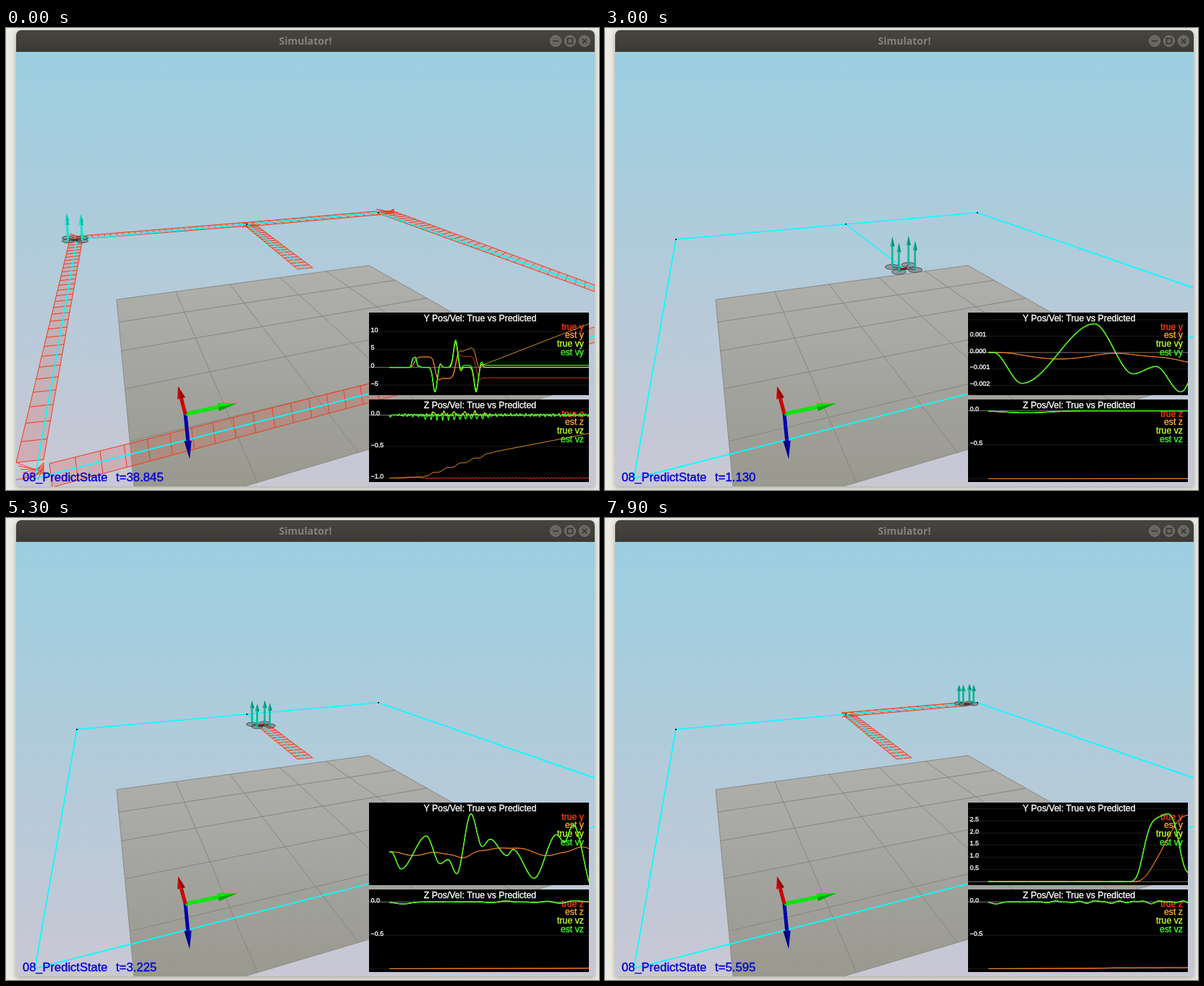
Write an HTML page with a canvas that moves like this. It is 820 px wide and 638 px high and loops after 8000 ms.

```html
<!DOCTYPE html>
<html lang="en">
<head>
<meta charset="utf-8">
<title>Simulator</title>
<style>
html, body { margin: 0; width: 100%; height: 100%; overflow: hidden; background: #ebebe4; }
canvas { display: block; }
</style>
</head>
<body>
<canvas id="stage" width="820" height="638"></canvas>
<script>
const c = document.getElementById('stage').getContext('2d');
const SANS = '"Liberation Sans", Arial, sans-serif';
const TITLE = '"Open Sans", "Noto Sans", sans-serif';
const LOOP = 8000, RESTART = 1800;
const HOLDS = [1200, 2300, 4800, 5400, 6100];
const RED = '#ff3c10', ORANGE = '#ffaa30', LIME = '#c4ff20', GREEN = '#3cff20';
const RAIL = '#f03c18';

const lerp = (a, b, k) => a + (b - a) * k;
const mix = (a, b, k) => [lerp(a[0], b[0], k), lerp(a[1], b[1], k)];
const clamp = v => Math.max(0, Math.min(1, v));
const smooth = v => { const s = clamp(v); return s * s * (3 - 2 * s); };
const bell = (t, mid, width, power = 2) => Math.exp(-(Math.abs((t - mid) / width) ** power));
const gate = (t, a, b) => clamp((t - a) * 2) * clamp((b - t) * 2);

// Value at t between [t, value] keys
function keyed(keys, t, ease = v => v) {
  let i = 0;
  while (i < keys.length - 2 && t >= keys[i + 1][0]) i++;
  const [a, b] = [keys[i], keys[i + 1]];
  return lerp(a[1], b[1], ease((t - a[0]) / (b[0] - a[0])));
}

// Simulator clock: the end of one run, then a fresh one
const clock = [[RESTART, .07], [2100, .335], [3700, 1.745], [4600, 2.55], [6000, 3.9], [7900, 5.595]];
function simTime(ms) {
  const t = ms < RESTART ? 38.845 + .00064 * ms : keyed(clock, ms);
  return Math.round(t * 200) / 200;
}

// Hover drift in mm/s, given by its turning points
const drift = [[.03, 0], [.19, -1.88], [.6, 1.75], [.82, -1.3], [.95, -.85], [1.09, -2.4], [1.32, 4.2], [1.5, .6],
  [1.63, 1.4], [1.9, -.4], [2, .25], [2.34, -2.9], [2.7, 1.9], [2.83, 1.1], [2.97, 3], [3.32, -4.7], [3.62, 4.6],
  [3.92, -9.8], [4.05, 0], [4.1, 0]];

// One side step, then a sharp turn every four seconds
function sideSpeed(t) {
  let v = keyed(drift, t, smooth) / 1000;
  v += 2.7 * (1 + .25 * (t - 4.84)) * bell(t, 4.84, .55, 4) + .35 * bell(t, 5.75, .35);
  for (let i = 0; i < 3; i++) {
    const mid = 8.9 + 4 * i, peak = i % 2 ? 7.1 : -6.9;
    v += peak * (bell(t, mid, .55) - .16 * bell(t, mid + 1, .35));
  }
  return v;
}
const trueVy = t => sideSpeed(t) + .004 * bell(t, 3.95, .3);
const estVy = t => sideSpeed(t) + .56 * clamp((t - 11.5) * 2);

function integral(f) {
  const dt = .005, sums = [0];
  for (let i = 0; i < 9000; i++) sums.push(sums[i] + f((i + .5) * dt) * dt);
  return t => {
    const i = Math.floor(t / dt);
    return lerp(sums[i], sums[i + 1], t / dt - i);
  };
}
const trueY = integral(trueVy), estY = integral(estVy);

const ripple = t => -.03 * bell(t, .22, .17) +
  clamp((t - .7) / 2) * (.012 * Math.sin(10.7 * t) + .008 * Math.sin(17.3 * t + 1) + .007 * Math.sin(6.1 * t + 2));
const trueVz = t => ripple(t) + .06 * gate(t, 7, 19) * Math.max(0, Math.sin(3.1 * t)) ** 3;
const estVz = t => ripple(t) - .07 * gate(t, 5.8, 19.6) * Math.max(0, Math.sin(5.6 * t)) ** 2;
const trueZ = t => -1 + .01 * Math.min(1, t / 20) * Math.sin(9 * t) + .016 * gate(t, 3, 6.5);
const estZ = t => -1 + .003 * Math.min(t, 6) + .4 * clamp((t - 6.5) / 14) + .0158 * Math.max(0, t - 20.5) +
  .013 * gate(t, 7, 20) * Math.sin(2.4 * t);

// Basic drawing
function path(pts, stroke, width = 1, fill = null) {
  c.beginPath();
  pts.forEach(([x, y], i) => i ? c.lineTo(x, y) : c.moveTo(x, y));
  if (fill) { c.closePath(); c.fillStyle = fill; c.fill(); }
  if (stroke) { c.strokeStyle = stroke; c.lineWidth = width; c.stroke(); }
}

function disc(x, y, rx, ry, fill, stroke) {
  c.beginPath();
  c.ellipse(x, y, rx, ry, 0, 0, 7);
  c.fillStyle = fill;
  c.fill();
  c.strokeStyle = stroke;
  c.lineWidth = 1;
  c.stroke();
}

// A hairline outline gives the even weight of plotted lettering
function text(s, x, y, size, color, align = 'left') {
  c.font = size + 'px ' + SANS;
  c.fillStyle = c.strokeStyle = color;
  c.lineWidth = .35;
  c.textAlign = align;
  c.fillText(s, x, y);
  c.strokeText(s, x, y);
}

function vGrad(y0, y1, ...stops) {
  const g = c.createLinearGradient(0, y0, 0, y1);
  stops.forEach((s, i) => g.addColorStop(i / (stops.length - 1), s));
  return g;
}

// Arrow with a cone head, darker on one side
function arrow(x0, y0, x1, y1, shaft, head, len, color, dark) {
  const a = Math.atan2(y1 - y0, x1 - x0), ux = Math.cos(a), uy = Math.sin(a);
  const bx = x1 - ux * len, by = y1 - uy * len, h = head / 2;
  path([[x0, y0], [bx, by]], color, shaft);
  path([[bx - uy * h, by + ux * h], [x1, y1], [bx + uy * h, by - ux * h]], null, 0, color);
  path([[bx, by], [x1, y1], [bx - uy * h, by + ux * h]], null, 0, dark);
}

// Ground: unit square seen in perspective
function ground(u, v) {
  const w = 1 + .222 * u - .54 * v;
  return [(460.4 * u - 69.7 * v + 153) / w, (25.8 * u - 63.6 * v + 375) / w];
}

function drawGround() {
  path([ground(0, 0), ground(1, 0), ground(1, 1), ground(0, 1)], '#8a8a86', 1, vGrad(328, 633, '#b0b0ac', '#a4a4a0', '#99998f'));
  for (let i = 1; i < 5; i++) {
    path([ground(i / 5, 0), ground(i / 5, 1)], '#868682');
    path([ground(0, i / 5), ground(1, i / 5)], '#868682');
  }
}

// Two rails with rungs; k sets how the rung spacing shrinks or grows
function ribbon(a, b, a2, b2, n, k, p = 1) {
  if (p <= 0) return;
  path([a, mix(a, b, p), mix(a2, b2, p), a2], RAIL, 1, 'rgba(235,75,55,.2)');
  for (let i = 1; i < n; i++) {
    const q = i / n, s = q / (q + (1 - q) * k);
    if (s < p) path([mix(a, b, s), mix(a2, b2, s)], RAIL);
  }
}

// Crossing strokes where the trail turns
function tangle(x, y, w, h, n) {
  for (let i = 0; i < n; i++) {
    const q = i / (n - 1);
    path([[x + w * q * .4, y + h * q], [x + w, y + h * (1 - q) * .6], [x + w * q, y + h]], RAIL, .9);
  }
}

function drawTrails(late, p, p2) {
  ribbon([403, 333], [328, 271], [424, 331], [343, 270], 20, .75, p);
  ribbon([327, 269], [512, 253], [341, 273.5], [520, 257.5], 16, 1, p2);
  if (p > .97) tangle(327, 268, 16, 7, 4);
  if (!late) return;
  ribbon([512, 255], [814, 364], [536, 253], [814, 355], 32, 1.5);
  tangle(512, 250, 24, 8, 6);
  ribbon([830, 409], [60, 601.5], [834, 429], [64, 634], 34, 1.6);
  ribbon([88, 293], [14, 600], [106, 291], [52, 596], 30, 3);
  ribbon([110, 286.5], [330, 268.5], [112, 291], [333, 273.5], 26, 1);
  tangle(88, 284, 18, 10, 6);
  tangle(14, 600, 38, 24, 6);
}

const course = [[98, 292], [333, 271], [515, 255], [860, 375]];
const home = [413, 332];
function drawCourse() {
  path([...course].reverse().concat([[40, 622], [860, 414.5]]), '#00ffff', 1.7);
  path([course[1], home], '#00ffff', 1.4);
  c.fillStyle = '#052a2a';
  for (const [x, y] of course) c.fillRect(x - 1, y - 1, 2, 2);
}

function drawAxes() {
  arrow(248, 533, 254, 595, 5, 10, 25, '#0000a8', '#000078');
  arrow(248, 533, 320, 518, 5, 11, 27, '#00e800', '#00a800');
  arrow(248, 533, 238, 495, 5, 11, 17, '#d00000', '#900000');
}

// The drone looks smaller and flatter the farther it is, so the higher it stands
function drawDrone(t, x, y, late) {
  const reach = 17 - (331 - y) * .08, flat = .3 - (331 - y) * .0025;
  const yaw = late ? Math.PI / 4 : .4;
  const color = late ? '#10e4cc' : '#08b894', dark = late ? '#08b4a4' : '#068a72';
  const rotors = [0, 1, 2, 3].map(i => {
    const a = yaw + i * Math.PI / 2;
    return [x + reach * Math.cos(a), y + reach * flat * Math.sin(a), reach * 2.4 + Math.sin(9 * t + i * 2)];
  }).sort((a, b) => a[1] - b[1]);
  for (const [rx, ry] of rotors) {
    path([[x, y], [rx, ry]], '#333', 1.5);
    disc(rx, ry, reach * .58, reach * .2, 'rgba(110,115,120,.55)', '#4a4c50');
  }
  c.fillStyle = '#2a2a2a';
  c.fillRect(x - 4, y - 1, 8, 3);
  path([[x - 4, y], [x + 5, y - 1]], '#c02818', 1.4);
  for (const [rx, ry, len] of rotors) arrow(rx, ry, late ? rx - 2 : rx, ry - len, 2.6, 6, len * .33, color, dark);
}

// Plots
function niceStep(range) {
  const e = 10 ** Math.floor(Math.log10(range));
  return [.1, .2, .5, 1].map(m => m * e).find(s => range / s < 7);
}

function plot(top, axis, fns, t, fixedStep) {
  const span = Math.max(1, t), end = 276 * t / span, bottom = top + 114;
  const rows = fns.map(() => []);
  let lo = Infinity, hi = -Infinity;
  for (let px = 0; px <= end; px += .5) fns.forEach((f, i) => {
    const v = f(px * span / 276);
    lo = Math.min(lo, v);
    hi = Math.max(hi, v);
    rows[i].push([530 + px, v]);
  });
  const yOf = v => top + 109.5 - (v - lo) / (hi - lo) * 94;
  const step = fixedStep || niceStep(hi - lo);
  const digits = Math.max(0, -Math.floor(Math.log10(step) + 1e-9));

  c.save();
  c.beginPath();
  c.rect(502, top, 304, 114);
  c.clip();
  c.fillStyle = '#000';
  c.fillRect(502, top, 304, 114);
  for (let i = Math.floor(lo / step) - 1; i <= Math.ceil(hi / step) + 1; i++) {
    const y = yOf(i * step);
    path([[502, y], [806, y]], i ? '#1c1c1c' : '#777');
    if (y > top + 10 && y < bottom - 5.2)
      text((i < 0 ? '−' : '') + Math.abs(i * step).toFixed(digits), 504.5, y + .5, 9, '#fff');
  }
  text(axis.toUpperCase() + ' Pos/Vel: True vs Predicted', 655.5, top + 12, 12.3, '#fff', 'center');
  const colors = [RED, ORANGE, LIME, GREEN];
  ['true ', 'est ', 'true v', 'est v'].forEach((s, i) => text(s + axis, 799, top + 23.5 + i * 11.8, 12.3, colors[i], 'right'));
  c.lineJoin = 'round';
  rows.forEach((r, i) => path(r.map(([x, v]) => [x, yOf(v)]), colors[i], i < 2 ? 1 : 1.25));
  c.restore();
}

function drawWindow() {
  c.fillStyle = '#ebebe4';
  c.fillRect(0, 0, 820, 638);
  c.save();
  c.shadowColor = 'rgba(0,0,0,.3)';
  c.shadowBlur = 7;
  c.shadowOffsetY = 2;
  c.fillStyle = vGrad(3, 33, '#46453f', '#3b3a36');
  c.beginPath();
  c.roundRect(14, 3, 800, 630, [7, 7, 0, 0]);
  c.fill();
  c.restore();
  c.font = 'bold 14px ' + TITLE;
  c.fillStyle = '#84837c';
  c.textAlign = 'center';
  c.fillText('Simulator!', 414, 23);
  for (const x of [760, 780, 800]) disc(x, 18, 7.5, 7.5, '#66655e', '#7c7a73');
  const ink = '#32312d';
  path([[756, 18], [764, 18]], ink, 1.4);
  c.strokeRect(776.5, 14.5, 7, 7);
  path([[797, 15], [803, 21]], ink, 1.4);
  path([[803, 15], [797, 21]], ink, 1.4);
}

function render(ms) {
  const t = simTime(ms), late = ms < RESTART;
  const p = smooth((t - 1.8) / 2.1);
  const p2 = t < 4.09 ? 0 : late ? 1 : clamp(trueY(t) / 3);
  const pos = late ? [95.5, 292] : p2 > 0 ? mix(course[1], course[2], p2) : mix(home, course[1], p);

  drawWindow();
  c.save();
  c.beginPath();
  c.rect(14, 33, 800, 600);
  c.clip();
  c.fillStyle = vGrad(33, 633, '#9bcfe0', '#b2cbda', '#c9c7d4');
  c.fillRect(14, 33, 800, 600);
  drawGround();
  drawTrails(late, p, p2);
  drawCourse();
  drawAxes();
  drawDrone(t, ...pos, late);
  text('08_PredictState', 23, 626, 16.5, '#0000d8');
  text('t=' + t.toFixed(3), 152, 626, 16.8, '#0000d8');
  plot(393, 'y', [trueY, estY, trueVy, estVy], t);
  plot(513, 'z', [trueZ, estZ, trueVz, estVz], t, .5);
  c.restore();
}

let start = null, shown = 0;
function tick(now) {
  if (start === null) start = now;
  let ms = Math.floor(((now - start) % LOOP) / 100) * 100;
  if (HOLDS.includes(ms)) ms -= 100;
  if (ms !== shown) render(shown = ms);
  requestAnimationFrame(tick);
}
render(0);
requestAnimationFrame(tick);
</script>
</body>
</html>
```
